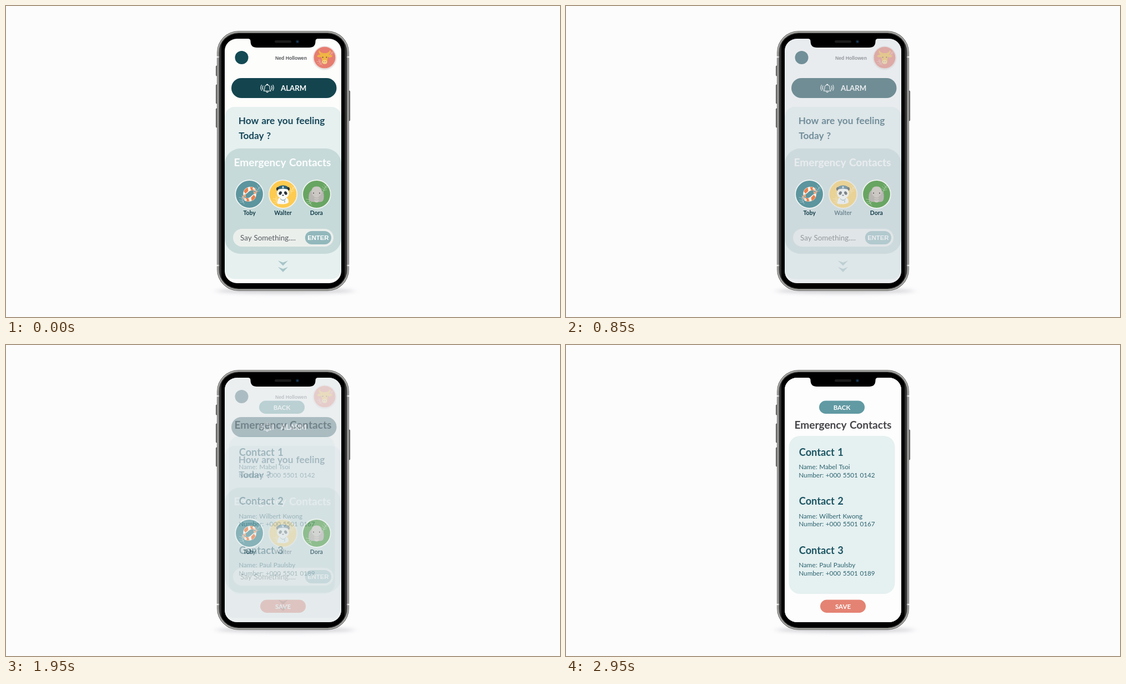
Write an HTML page that moves like this. It is 998 by 561 pixels and loops after 3000 ms.

```html
<!DOCTYPE html>
<html lang="en">
<head>
<meta charset="utf-8">
<title>Care app</title>
<style>
  html, body { margin: 0; width: 100%; height: 100%; overflow: hidden; background: #fcfcfd; }
  svg { display: block; width: 998px; height: 561px; }
  text { font-family: Lato, "Open Sans", sans-serif; word-spacing: .06em; }
  .bold { font-weight: 700; }
  .mid { text-anchor: middle; }
  .arial { font-family: "Liberation Sans", Arial, sans-serif; font-weight: 700; word-spacing: 0; }
  .question { font-size: 17.2px; fill: #17475a; }
  .title { font-size: 19.1px; }
  .person { font-size: 10.4px; fill: #133c49; }
  .button { font-size: 11.5px; fill: #fff; }
  .heading { font-size: 18.2px; fill: #1b5563; }
  .detail { font-size: 11.7px; fill: #2b6370; }
  .leaf { fill: none; stroke: #fff; stroke-width: .8; stroke-linecap: round; opacity: .45; }

  #dim { animation: dim 3s infinite; }
  #contacts { animation: page 3s infinite; }
  @keyframes dim {
    0% { opacity: 0; }
    20% { opacity: 0; animation-timing-function: ease; }
    36.667%, 100% { opacity: 1; }
  }
  @keyframes page {
    0% { opacity: 0; }
    61.667% { opacity: 0; animation-timing-function: ease-out; }
    78.333%, 100% { opacity: 1; }
  }
</style>
</head>
<body>
<svg viewBox="0 0 998 561">
  <defs>
    <clipPath id="screen"><rect x="394" y="59" width="210" height="441" rx="22"/></clipPath>
    <linearGradient id="bezel">
      <stop offset="0" stop-color="#4c4c4c"/>
      <stop offset=".022" stop-color="#000"/>
      <stop offset=".978" stop-color="#000"/>
      <stop offset="1" stop-color="#4c4c4c"/>
    </linearGradient>
    <filter id="blur" x="-20%" y="-200%" width="140%" height="500%"><feGaussianBlur stdDeviation="7 3"/></filter>
    <filter id="soft" x="-20%" y="-20%" width="140%" height="140%"><feGaussianBlur stdDeviation="1.2"/></filter>
    <path id="sprig" class="leaf" d="M0 10Q1 2 7-4M1 6l-4-3M2 3l-4-4M4 0L1-5M1 6l5-1M3 2l5-1M5-1l4-1"/>
    <g id="koi">
      <path d="M-11 3C-13-8-3-14 6-12C10-11 13-7 13-3C10-6 5-7 1-5C-3-3-5 2-11 3Z" fill="#fbf3e9"/>
      <path d="M-10-4Q-8-9-3-11L-2-5L-7 0ZM1-12L6-12L8-6L3-6ZM9-10L13-4L10-6Z" fill="#ec7f4c"/>
      <path d="M-10 2L-14 7L-9 5L-6 7L-7 1Z" fill="#f3a77d"/>
      <circle cx="6.5" cy="-9" r="1" fill="#fff"/>
    </g>
  </defs>

  <ellipse cx="503" cy="514" rx="124" ry="5" fill="#8a8a92" opacity=".35" filter="url(#blur)"/>

  <!-- side buttons -->
  <g fill="#77777a" stroke="#3c3c3e" stroke-width=".7">
    <rect x="378.4" y="108" width="4" height="18" rx="1.2"/>
    <rect x="378.4" y="142" width="4" height="34" rx="1.2"/>
    <rect x="378.4" y="185" width="4" height="34" rx="1.2"/>
    <rect x="615.6" y="153" width="4" height="54" rx="1.2"/>
  </g>

  <!-- body -->
  <rect x="380" y="45" width="238" height="469" rx="39" fill="#666664"/>
  <rect x="381" y="46" width="236" height="467" rx="38" fill="#b2b2ae"/>
  <rect x="383" y="48" width="232" height="463" rx="36" fill="#454545"/>
  <rect x="384.5" y="49.5" width="229" height="460" rx="34.5" fill="url(#bezel)"/>
  <path d="M380 92h3.5M614.5 92h3.5M380 468h3.5M614.5 468h3.5" stroke="#e4e4e4" stroke-width="2.4"/>

  <g clip-path="url(#screen)">
    <!-- home -->
    <rect x="394" y="59" width="210" height="441" fill="#fdfdfc"/>
    <circle cx="424.5" cy="93" r="12" fill="#134a54"/>
    <text class="arial mid" x="513.5" y="97" font-size="8.6" fill="#58595c">Ned Hollowen</text>

    <circle cx="574" cy="94" r="20.6" fill="#8a8a8a" opacity=".4" filter="url(#soft)"/>
    <circle cx="574" cy="93" r="20" fill="#e67d70" stroke="#ecdcd9" stroke-width="1.4"/>
    <use href="#sprig" transform="translate(583 85) scale(.8)"/>
    <use href="#sprig" transform="translate(563 103) rotate(-60) scale(.8)"/>
    <g fill="#f0b544">
      <path d="M567 88Q562 85 564 79Q566 84 571 85H577Q582 84 584 79Q586 85 581 88L579 96Q579 104 574 105Q569 104 569 96Z"/>
      <path d="M568 88Q562 87 560 91Q565 94 569 91ZM580 88Q586 87 588 91Q583 94 579 91Z"/>
    </g>
    <ellipse cx="574" cy="101" rx="4.5" ry="3.5" fill="#f6d189"/>
    <g fill="#5b4030">
      <circle cx="570.6" cy="92.5" r="1"/><circle cx="577.4" cy="92.5" r="1"/>
      <circle cx="572.4" cy="100.5" r=".6"/><circle cx="575.6" cy="100.5" r=".6"/>
    </g>

    <rect x="406" y="130" width="189.5" height="36" rx="18" fill="#14454f"/>
    <g fill="none" stroke="#fff" stroke-width="1.1" stroke-linecap="round" stroke-linejoin="round">
      <path d="M464.2 153.2H477C475 151 475.2 149.5 475.2 147A4.6 4.6 0 0 0 466 147C466 149.5 466.2 151 464.2 153.2ZM469.3 142.3Q470.6 140 471.9 142.3M468.9 154.6Q470.6 156.6 472.3 154.6"/>
      <path d="M463 144Q461 147.5 463 151M460.4 142.5Q457.6 147.5 460.4 152.5M478.2 144Q480.2 147.5 478.2 151M480.8 142.5Q483.6 147.5 480.8 152.5"/>
    </g>
    <text class="bold" x="495" y="152.6" font-size="13.2" fill="#fff">ALARM</text>

    <rect x="394" y="182" width="210" height="310.5" rx="18" fill="#e5f0ef"/>
    <text class="bold question" x="418.8" y="213">How are you feeling</text>
    <text class="bold question" x="419.2" y="240.3">Today ?</text>

    <rect x="394" y="257" width="210" height="190" rx="28" fill="#c6dad9"/>
    <text class="bold mid title" x="498" y="288.7" fill="#fcfdfd">Emergency Contacts</text>

    <g transform="translate(499 339.5)">
      <circle r="25.3" fill="#fdcb50" stroke="#f4f2ea" stroke-width="1.7"/>
      <use href="#sprig" x="14" y="-11"/>
      <use href="#sprig" transform="translate(-15 12) rotate(-45)"/>
      <path d="M-10 17Q-11 5 0 5Q11 5 10 15Q6 18 0 18Q-6 18-10 17Z" fill="#f7f7f4"/>
      <g fill="#2b3338">
        <circle cx="-8.5" cy="-9.5" r="3.6"/><circle cx="8.5" cy="-9.5" r="3.6"/>
      </g>
      <ellipse cy="-2" rx="11" ry="10" fill="#fafaf7"/>
      <g fill="#2b3338">
        <ellipse cx="-4.8" cy="-2" rx="2.5" ry="3.3" transform="rotate(28 -4.8 -2)"/>
        <ellipse cx="4.8" cy="-2" rx="2.5" ry="3.3" transform="rotate(-28 4.8 -2)"/>
        <ellipse cy="2" rx="1.7" ry="1.1"/>
      </g>
      <path d="M-7-9L-8-14Q0-18 8-14L7-9Q0-11-7-9Z" fill="#285f74"/>
      <path d="M0-14.5v4M-2-12.5h4" stroke="#fff" stroke-width="1.2"/>
      <path d="M-5 8Q0 14 5 8M3 11v4" fill="none" stroke="#5b8794"/>
    </g>
    <text class="bold mid person" x="499" y="377">Walter</text>

    <rect x="409" y="402" width="181" height="32" rx="16" fill="#ebefec"/>
    <text x="422" y="423" font-size="13.4" fill="#555b5f">Say Something....</text>
    <rect x="538.8" y="406" width="47.2" height="24" rx="12" fill="#92b8bc"/>
    <text class="arial mid" x="562.3" y="422.2" font-size="11.3" fill="#fff">ENTER</text>

    <path d="M490 459.2L499 462.8L508 459.2L499 468.5ZM490 470.7L499 474.3L508 470.7L499 480Z" fill="#a8c4c8"/>

    <rect id="dim" x="394" y="59" width="210" height="441" fill="rgba(211,218,223,.6)"/>

    <!-- people kept above the dimming -->
    <g transform="translate(438.5 339.5)">
      <circle r="25.3" fill="#5c959e" stroke="#f1f4f2" stroke-width="1.7"/>
      <use href="#sprig" x="13" y="-11"/>
      <use href="#sprig" transform="translate(-16 10) rotate(-40)"/>
      <use href="#koi" transform="translate(0 -1)"/>
      <use href="#koi" transform="translate(1 1) rotate(180)"/>
    </g>
    <text class="bold mid person" x="438.7" y="377">Toby</text>

    <g transform="translate(559.5 339.5)">
      <circle r="25.3" fill="#68a562" stroke="#f1f4f2" stroke-width="1.7"/>
      <use href="#sprig" x="12" y="-13"/>
      <use href="#sprig" transform="translate(-16 13) rotate(-45)"/>
      <path d="M-8-8Q-15-4-14 6Q-13 14-6 14H6Q13 14 13 6Q14-4 8-8Z" fill="#b9b6b3"/>
      <path d="M-9-5Q-9-14 0-14Q9-14 9-5Q9 2 4 4V13Q0 17-4 13V4Q-9 2-9-5Z" fill="#cbc8c4"/>
      <path d="M-4 6Q0 8 4 6M-4 9.5Q0 11.5 4 9.5" fill="none" stroke="#aaa6a3" stroke-width=".8"/>
      <g fill="#4b4948"><circle cx="-5.5" cy="-2" r="1"/><circle cx="5.5" cy="-2" r="1"/></g>
    </g>
    <text class="bold mid person" x="559.3" y="377">Dora</text>

    <!-- contact list -->
    <g id="contacts">
      <rect x="394" y="59" width="210" height="441" fill="#fdfdfd"/>
      <rect x="456" y="100.5" width="82" height="23.5" rx="11.75" fill="#619aa3"/>
      <text class="bold mid button" x="497" y="116.5">BACK</text>
      <text class="bold mid title" x="499" y="151" fill="#444449">Emergency Contacts</text>
      <rect x="401.5" y="164" width="191" height="285" rx="20" fill="#e5f0f0"/>
      <g>
        <text class="bold heading" x="419.8" y="199.8">Contact 1</text>
        <text class="detail" x="419.3" y="224.2">Name: Mabel Tsoi</text>
        <text class="detail" x="419.3" y="238.5">Number: +000 5501 0142</text>
      </g>
      <g transform="translate(0 88.6)">
        <text class="bold heading" x="419.8" y="199.8">Contact 2</text>
        <text class="detail" x="419.3" y="224.2">Name: Wilbert Kwong</text>
        <text class="detail" x="419.3" y="238.5">Number: +000 5501 0167</text>
      </g>
      <g transform="translate(0 177.2)">
        <text class="bold heading" x="419.8" y="199.8">Contact 3</text>
        <text class="detail" x="419.3" y="224.2">Name: Paul Paulsby</text>
        <text class="detail" x="419.3" y="238.5">Number: +000 5501 0189</text>
      </g>
      <rect x="458" y="459.5" width="82" height="23.5" rx="11.75" fill="#e48373"/>
      <text class="bold mid button" x="499" y="475.5">SAVE</text>
    </g>
  </g>

  <!-- notch -->
  <path d="M436 58V59Q440.5 59 440.5 63.5Q440.5 75 452 75H546Q557.5 75 557.5 63.5Q557.5 59 562 59V58Z"/>
  <rect x="484" y="62" width="30" height="4.4" rx="2.2" fill="#1c1c1d"/>
  <circle cx="525" cy="64.2" r="3.2" fill="#0b1722"/>
  <circle cx="525" cy="64.2" r="1.5" fill="#1d4263"/>
</svg>
</body>
</html>
```
